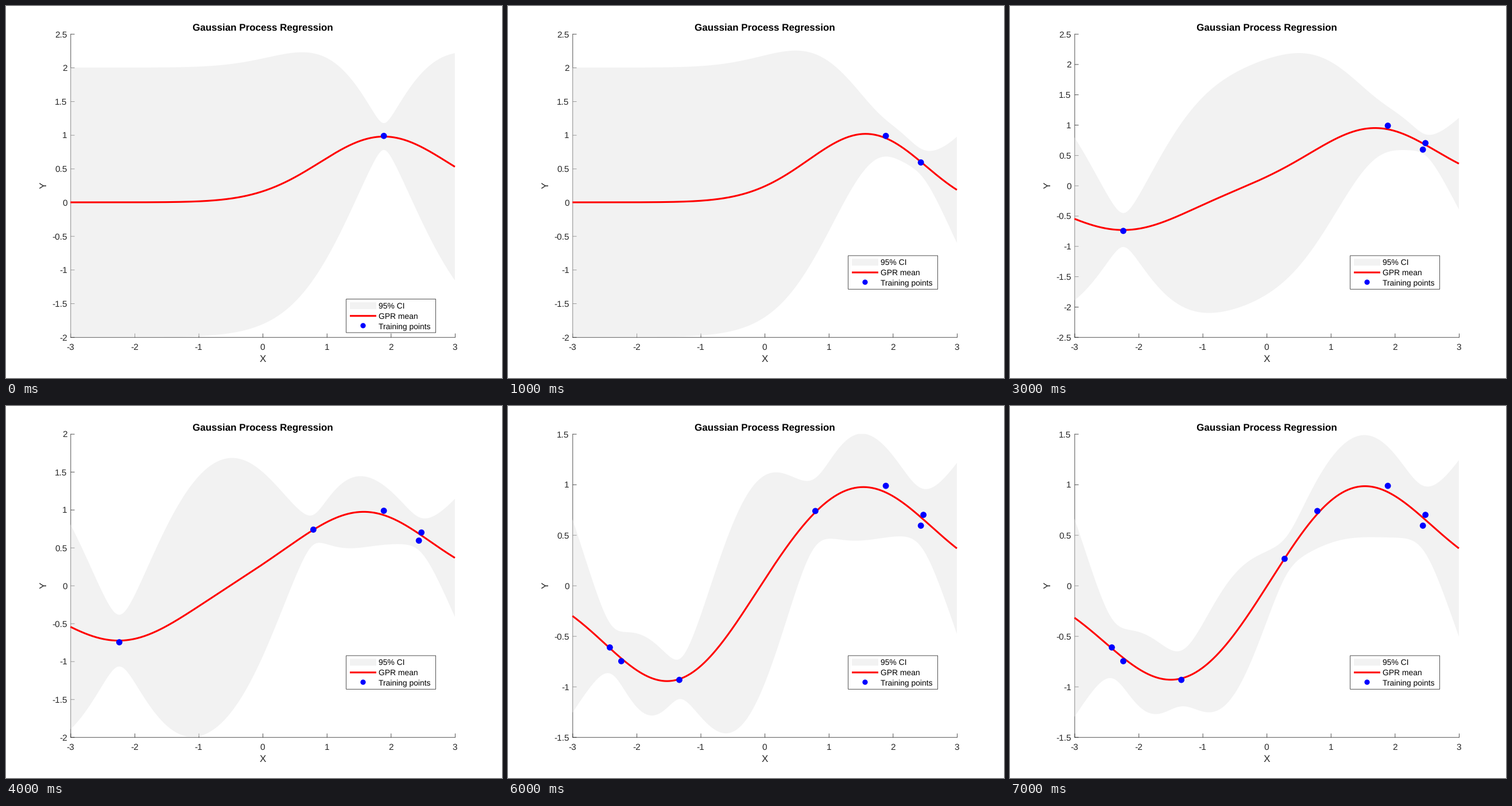
A matplotlib script that plays this animation: 864 by 648 pixels, repeating every 8000 ms.

```python
import matplotlib.pyplot as plt
import numpy as np
from matplotlib.animation import FuncAnimation
from matplotlib.patches import Circle, Polygon, Rectangle

W, H = 864, 648
LEFT, RIGHT = 0.13 * W, 0.905 * W
TOP, BOTTOM = 0.075 * H, 0.89 * H
PT = 1.543  # pixels per point
HAIR = 0.8
INK = "0.15"

plt.rcParams["font.family"] = "Liberation Sans"
plt.rcParams["text.hinting"] = "none"

# Training points in the order they arrive
PX = np.array([1.891, 2.438, -2.238, 2.478, 0.791, -2.417, -1.332, 0.280])
PY = np.array([0.986, 0.592, -0.749, 0.699, 0.737, -0.613, -0.934, 0.264])

# Vertical range of the axes after each point
LIMITS = [(-2, 2.5), (-2, 2.5), (-2.5, 2.5), (-2.5, 2.5),
          (-2, 2), (-2.005, 2), (-1.5, 1.5), (-1.5, 1.5)]
NOISE = 0.01
GRID = np.linspace(-3, 3, 400)

fig = plt.figure(figsize=(W / 72, H / 72), dpi=72, facecolor="white")
ax = fig.add_axes([0, 0, 1, 1])


def kernel(a, b):
    return np.exp(-0.5 * (a[:, None] - b[None, :]) ** 2)


def regress(n):
    """Mean and two-sigma width; noise adds up with the age of a point."""
    x, y = PX[:n], PY[:n]
    cov = kernel(x, x) + np.diag(NOISE * np.arange(n, 0, -1))
    cross = kernel(GRID, x)
    mean = cross @ np.linalg.solve(cov, y)
    var = 1 - np.sum(cross * np.linalg.solve(cov, cross.T).T, axis=1)
    return mean, 2 * np.sqrt(np.maximum(var, 0))


def to_x(x):
    return LEFT + (np.asarray(x) + 3) / 6 * (RIGHT - LEFT)


def text(x, y, s, points, **kw):
    kw = {"color": INK, "ha": "center", "va": "baseline", **kw}
    ax.text(x, y, s, fontsize=points * PT, **kw)


def stroke(xs, ys, color=INK, width=HAIR, **kw):
    ax.plot(xs, ys, color=color, lw=width, snap=False,
            solid_capstyle="butt", **kw)


def dot(x, y, size, z):
    ax.add_patch(Circle((x, y), size / 2, fc="blue", lw=0, zorder=z))


def draw_axes(low, high, to_y):
    # Hairlines sit half a pixel past the plot edge
    side, base = LEFT + 0.5, BOTTOM + 0.5
    stroke([side, side], [TOP, base + HAIR / 2], zorder=1)
    stroke([side - HAIR / 2, RIGHT + 0.9], [base, base], zorder=1)
    for v in range(-3, 4):
        x = to_x(v) + 0.5
        stroke([x, x], [base, base - 6.7], zorder=1)
        text(to_x(v), 598.6, str(v), 10)
    for v in np.arange(np.ceil(low * 2), high * 2 + 1) / 2:
        y = to_y(v) + 0.5
        stroke([side, side + 6.7], [y, y], zorder=1)
        text(106.6, y + 5.3, f"{v:g}", 10, ha="right")
    text(447.2, 42.4, "Gaussian Process Regression", 11,
         color="black", weight="bold")
    text(447.2, 620.2, "X", 11)
    text(70.4, 312.6, "Y", 11, rotation=90, rotation_mode="anchor")


def draw_legend(top):
    ax.add_patch(Rectangle((592.6, top), 156, 58.4, fc="white", ec=INK,
                           lw=HAIR, snap=False, zorder=6))
    ax.add_patch(Rectangle((599, top + 5.4), 46, 12, fc="0.95", lw=0,
                           snap=False, zorder=7))
    stroke([599, 645], [top + 29.2] * 2, "red", 2 * PT, zorder=7)
    dot(622, top + 46.2, 9.2, 7)
    labels = ("95% CI", "GPR mean", "Training points")
    for i, label in enumerate(labels):
        text(648.9, top + 16.4 + 17.8 * i, label, 9,
             ha="left", color="black", zorder=8)


def draw(step):
    ax.clear()
    ax.set_xlim(0, W)
    ax.set_ylim(H, 0)
    ax.axis("off")
    low, high = LIMITS[step]

    def to_y(v):
        return BOTTOM - (np.asarray(v) - low) / (high - low) * (BOTTOM - TOP)

    draw_axes(low, high, to_y)

    mean, width = regress(step + 1)
    xs = to_x(GRID)
    upper = np.maximum(to_y(mean + width), TOP)
    lower = np.minimum(to_y(mean - width), BOTTOM)
    outline = np.column_stack([np.concatenate([xs, xs[::-1]]),
                               np.concatenate([upper, lower[::-1]])])
    ax.add_patch(Polygon(outline, fc="0.9", alpha=0.5, lw=0, zorder=2))
    stroke(xs, to_y(mean), "red", 2 * PT, zorder=3)
    for x, y in zip(to_x(PX[:step + 1]), to_y(PY[:step + 1])):
        dot(x, y, 10.8, 4)
    draw_legend(510.6 if step == 0 else 434.9)
    return []


anim = FuncAnimation(fig, draw, frames=len(PX), init_func=lambda: [],
                     interval=1000, repeat=True, repeat_delay=0, blit=False)
plt.show()
```
